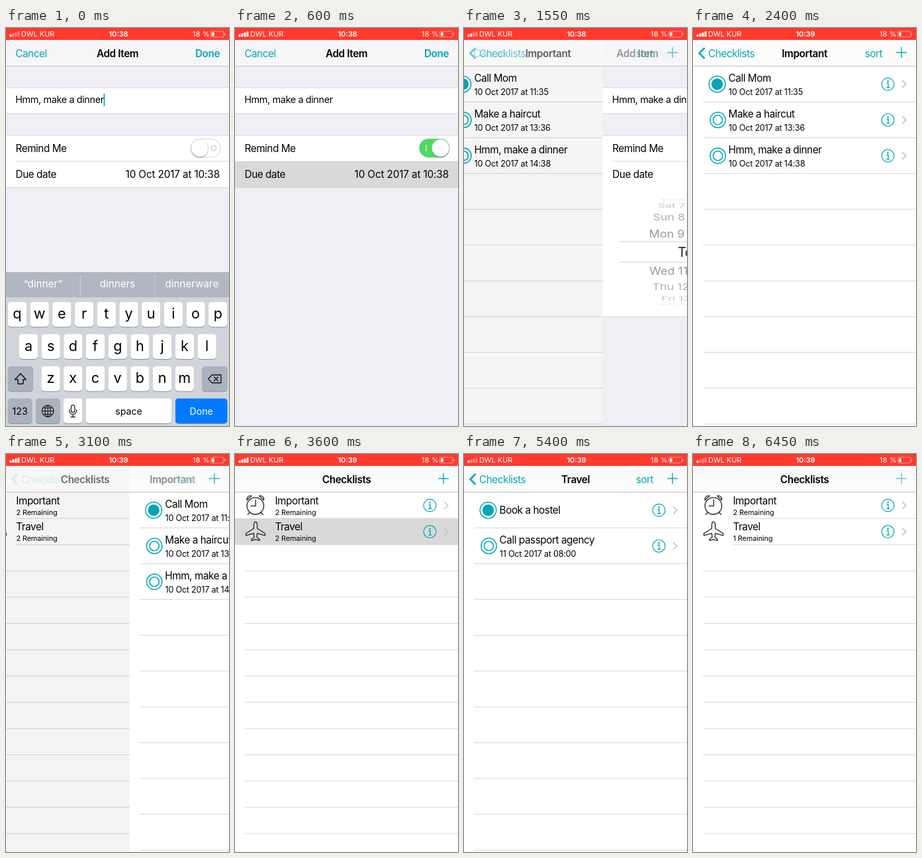
These frames come from a looping animation (337x600 px, 6500 ms). An HTML page:

```html
<!DOCTYPE html>
<html lang="en">
<head>
<meta charset="utf-8">
<title>Checklists</title>
<style>
html, body { margin: 0; width: 100%; height: 100%; overflow: hidden; background: #fff; }
svg { display: block; width: 337px; height: 600px; font-family: Inter, Roboto, sans-serif; }
text { white-space: pre; }
</style>
</head>
<body>
<svg id="stage" viewBox="0 0 337 600" xmlns="http://www.w3.org/2000/svg"></svg>
<script>
const W = 337, LOOP = 6500, STEP = 50;
const TEAL = '#08a5b5', LINE = '#d6d6da', GREY = '#f0eff5';
const stage = document.getElementById('stage');

const clamp = v => Math.max(0, Math.min(1, v));
const ramp = (t, a, b) => clamp((t - a) / (b - a));
const ease = v => v * v * (3 - 2 * v);
const easeOut = v => 1 - Math.pow(1 - v, 2.4);
const pad = n => String(n).padStart(2, '0');

const rect = (x, y, w, h, fill, extra = '') =>
  `<rect x="${x}" y="${y}" width="${w}" height="${h}" fill="${fill}" ${extra}/>`;
const hline = (x, y, x2 = W, c = LINE) => rect(x, y - .5, x2 - x, 1, c);
const path = (d, c, w, extra = '') =>
  `<path d="${d}" fill="none" stroke="${c}" stroke-width="${w}" ${extra}/>`;
const ring = (x, y, r, w, c = TEAL, fill = 'none') =>
  `<circle cx="${x}" cy="${y}" r="${r}" fill="${fill}" stroke="${c}" stroke-width="${w}"/>`;
const group = (x, y, body, op = 1) =>
  `<g transform="translate(${x.toFixed(2)} ${y.toFixed(2)})" opacity="${op.toFixed(3)}">${body}</g>`;

function text(s, x, y, o = {}) {
  const { size = 15.28, fill = '#000', anchor = 'start', weight = 400, track = -.028 } = o;
  return `<text x="${x}" y="${y}" font-size="${size}" fill="${fill}" text-anchor="${anchor}"` +
    ` font-weight="${weight}" letter-spacing="${(track * size).toFixed(3)}">${s}</text>`;
}

// ---------- status bar ----------
function statusBar(t) {
  const lit = t < 300 ? 1 : t < 1500 ? 4 : t < 2300 ? 2 : t < 5400 ? 4 : 1;
  const o = { size: 10.9, fill: '#fff', track: 0 };
  let s = rect(0, 0, W, 18, '#ff3b30');
  for (let i = 0; i < 4; i++) {
    const h = 3.4 + i * 1.5;
    s += rect(5.4 + i * 4, 13.2 - h, 3, h, '#fff', `rx=".7" opacity="${i < lit ? 1 : .4}"`);
  }
  return s + text('DWL KUR', 23, 13.3, o) +
    text(t < 2300 ? '10:38' : '10:39', 170, 13.3, { ...o, anchor: 'middle', weight: 600 }) +
    text('18 %', 282, 13.3, { ...o, track: .025 }) +
    rect(309.5, 5, 19.5, 8.6, 'none', 'rx="2" stroke="#fff" stroke-width=".9" opacity=".55"') +
    rect(311, 6.5, 3.8, 5.6, '#fff', 'rx=".8"') +
    rect(330, 7.6, 1.3, 3.4, '#fff', 'rx=".6" opacity=".55"');
}

// ---------- navigation bar items ----------
const title = (s, dx) =>
  text(s, 168.6 + dx, 43.5, { weight: 600, anchor: 'middle', track: -.024 });
const plus = op =>
  path('M307 37H323M315 29V45', TEAL, 1.4, `opacity="${op}"`);

function listNav(name, dx, backOp) {
  const back = path('M17.5 30L9.5 38L17.5 46', TEAL, 2.5) + text('Checklists', 23, 43.5, { fill: TEAL });
  return group(0, 0, back, backOp) + title(name, dx) +
    text('sort', 259.7, 43.5, { fill: TEAL }) + plus(1);
}

// ---------- shared row parts ----------
const info = y => ring(294.5, y, 9.4, 1.2) +
  `<circle cx="294.6" cy="${y - 4.4}" r="1.3" fill="${TEAL}"/>` +
  path(`M292.6 ${y - 1.4}H295V${y + 5}M292.3 ${y + 5}H297.4`, TEAL, 1.4);
const chevron = y => path(`M316.3 ${y - 5.5}L321.8 ${y}L316.3 ${y + 5.5}`, '#c4c4ca', 1.7);
const check = (y, on) => on
  ? ring(36.5, y, 12.3, 1.5) + `<circle cx="36.5" cy="${y}" r="8.7" fill="${TEAL}"/>`
  : ring(37.5, y, 11.6, 1.6) + ring(37.5, y, 7.1, 1.6);

// ---------- item lists ----------
function itemList(items, glow = 0) {
  let s = rect(0, 18, W, 582, '#fff');
  if (glow) s += rect(0, 58, W, 53.4, '#d9d9d9', `opacity="${glow}"`);
  for (let y = 111.4; y < 600; y += 53.95) s += hline(15, y);
  items.forEach(([name, due, on], i) => {
    const y = 84.7 + i * 53.95;
    s += check(y, on) + text(name, 53.6, due ? y - 3.4 : y + 5.6) + info(y) + chevron(y);
    if (due) s += text(due, 53.8, y + 16.2, { size: 12.6, track: -.017 });
  });
  return s;
}

const important = {
  body: () => itemList([
    ['Call Mom', '10 Oct 2017 at 11:35', true],
    ['Make a haircut', '10 Oct 2017 at 13:36'],
    ['Hmm, make a dinner', '10 Oct 2017 at 14:38']
  ]),
  nav: (t, dx) => listNav('Important', dx, t >= 3000 ? .35 : 1)
};

const travel = {
  body: t => itemList([
    ['Book a hostel', '', t >= 4450],
    ['Call passport agency', '11 Oct 2017 at 08:00']
  ], t < 4400 ? 0 : 1 - ramp(t, 4400, 4600)),
  nav: (t, dx) => listNav('Travel', dx, t >= 5850 ? .35 : 1)
};

// ---------- overview of checklists ----------
function clockIcon() {
  const bell = 'M18.2 69.5A5.2 5.2 0 0 1 24.8 63.2';
  const foot = 'M22.3 88L19.3 91.3';
  const side = path(bell + 'Z' + foot, '#222', 1.3, 'stroke-linecap="round"');
  return ring(30.8, 78.3, 12.7, 1.3, '#222') + path('M31.2 68.5V78.3H23.5', '#222', 1.3) +
    side + `<g transform="translate(61.6 0) scale(-1 1)">${side}</g>`;
}
function planeIcon() {
  const half = path('M31 102.3C29.4 102.3 28.4 104.5 28.4 107V112.2L16.5 119.8V122.8L28.4 119.6' +
    'L28.9 125.4L25 128.4V130.4L31 128.8', '#222', 1.3, 'stroke-linejoin="round"');
  return half + `<g transform="translate(62 0) scale(-1 1)">${half}</g>`;
}

const overview = {
  body(t) {
    let s = rect(0, 18, W, 582, '#fff');
    for (let i = 1; i < 14; i++) s += hline(i < 3 ? 61 : 15, 57.5 + i * 39.6);
    if (t >= 3600 && t < 4000) s += rect(0, 97, W, 40, '#d9d9d9');
    const left = t < 5000 ? 2 : 1;
    [['Important', 2], ['Travel', left]].forEach(([name, n], i) => {
      const y = 77.5 + i * 39.6;
      s += text(name, 60.4, y - 1.7) + text(n + ' Remaining', 60.5, y + 14.3, { size: 10.8, track: -.006 }) +
        info(y) + chevron(y);
    });
    return s + clockIcon() + planeIcon();
  },
  nav: (t, dx) => title('Checklists', dx) + plus(1 - .4 * ramp(t, 6300, 6450))
};

// ---------- date picker ----------
const DAYS = ['Fri 6', 'Sat 7', 'Sun 8', 'Mon 9', 'Today', 'Wed 11', 'Thu 12', 'Fri 13', 'Sat 14'];

function wheel(pos, label, place) {
  let s = '';
  for (let n = Math.ceil(pos - 4.2); n <= pos + 4.2; n++) {
    const k = n - pos, d = Math.abs(k), a = k * 20.5 * Math.PI / 180;
    const on = d < .5, size = on ? 20 : 17.6;
    const [x, anchor] = place(d, n, on);
    const sx = on ? 1 : 1.04 - d * .014;
    s += `<g transform="translate(${x} ${(338 + 80 * Math.sin(a)).toFixed(2)}) scale(${sx} ${Math.cos(a).toFixed(3)})"` +
      ` opacity="${on ? 1 : (.56 - d * .1).toFixed(2)}">` +
      text(label(n), 0, size * .36, { size, anchor, fill: '#222', track: on ? -.032 : 0 }) + '</g>';
  }
  return s;
}

function picker(hour) {
  const mid = base => (d, n, on) => [on ? base : base - 1 - d * .6, 'middle'];
  return wheel(4, n => DAYS[n] ? DAYS[n] + (n === 4 ? '' : ' Oct') : '',
      (d, n, on) => [on ? 168 : n < 4 ? 159 : 162.3 + d * 1.4, 'end']) +
    wheel(hour, n => pad((n + 24) % 24), mid(199)) +
    wheel(38, n => pad(n % 60), mid(256)) +
    hline(25, 322, 312, '#cfcfd3') + hline(25, 353, 312, '#cfcfd3');
}

// ---------- keyboard ----------
function key(x, y, w, fill, label = '', size = 14.2, color = '#000', dy = 24) {
  return rect(x, y + 1, w, 37.4, '#8a8e94', 'rx="4.5"') + rect(x, y, w, 37.4, fill, 'rx="4.5"') +
    text(label, x + w / 2, y + dy, { size, fill: color, anchor: 'middle', track: 0 });
}

function keyboard() {
  let s = rect(0, 368, W, 232, '#d1d5db') + rect(0, 368, W, 38, '#b1b7c1');
  s += rect(111.7, 373, 1, 32, '#cdd1d8') + rect(224.4, 373, 1, 32, '#cdd1d8');
  ['“dinner”', 'dinners', 'dinnerware'].forEach((w, i) => {
    s += text(w, 56 + i * 112.5, 391, { fill: '#fff', anchor: 'middle', track: .006, size: 15 });
  });
  ['qwertyuiop', 'asdfghjkl', 'zxcvbnm'].forEach((row, r) => {
    [...row].forEach((c, i) => {
      s += key([2.8, 19.8, 53.4][r] + i * 33.7, 413 + r * 48.5, 28.3, '#fff', c, 21.6, '#000', 25.3);
    });
  });
  const dark = '#abb2bd', round = 'stroke-linejoin="round" stroke-linecap="round"';
  s += key(2.8, 510, 38, dark) + key(296.4, 510, 38, dark);
  s += path('M22 521L13.5 530H18V536.5H26V530H30.5Z', '#111', 1.4, round);
  s += path('M311.5 523H325V535H311.5L305.5 529ZM314.5 526L320.5 532M320.5 526L314.5 532', '#111', 1.3, round);
  s += key(2.8, 558.5, 36.5, dark, '123') + key(45, 558.5, 36.5, dark) + key(87, 558.5, 28.3, '#fff') +
    key(120.7, 558.5, 129.6, '#fff', 'space') + key(256, 558.5, 78.4, '#007aff', 'Done', 14.2, '#fff');
  s += ring(63.2, 577.5, 8.8, 1.1, '#111') +
    `<ellipse cx="63.2" cy="577.5" rx="4.2" ry="8.8" fill="none" stroke="#111"/>` +
    path('M54.4 577.5H72M63.2 568.7V586.3M56 572.8H70.4M56 582.2H70.4', '#111', 1);
  s += rect(98.5, 568.5, 5.4, 11, 'none', 'rx="2.7" stroke="#111" stroke-width="1.2"') +
    path('M95.8 575.5V577A5.4 5.4 0 0 0 106.6 577V575.5M101.2 582.4V586.3M98 586.3H104.4', '#111', 1.2, round);
  return s;
}

// ---------- add item form ----------
function toggle(p) {
  const x = 292.8 + 17.8 * p;
  return rect(279, 167.3, 45, 27.6, '#fff', 'rx="13.8" stroke="#dedee0" stroke-width="1.2"') +
    group(0, 0, ring(313.8, 181.2, 4, 1, '#b9b9bd'), 1 - p) +
    group(0, 0, rect(278.5, 167, 45.8, 28, '#4cd964', 'rx="14"') + rect(288.4, 176.5, 1.1, 9.6, '#fff'), p) +
    `<circle cx="${x}" cy="182.6" r="13.4" fill="#000" opacity=".2"/>` +
    ring(x, 181, 13, .6, '#d2d2d2', '#fff');
}

const form = {
  body(t) {
    const open = 195 * ease(ramp(t, 650, 900));
    const hour = 10 + 4 * easeOut(ramp(t, 950, 1300));
    const glow = t < 550 ? 0 : 1 - ramp(t, 600, 750);
    let s = rect(0, 18, W, 582, GREY) + rect(0, 90, W, 39, '#fff') + hline(0, 90) + hline(0, 129) +
      rect(0, 162, W, 78.5 + open, '#fff') + hline(0, 162) + hline(15, 201);
    if (glow) s += rect(0, 201, W, 39.5, '#d9d9d9', `opacity="${glow}"`);
    s += text('Hmm, make a dinner', 14.2, 113.4, { size: 14.4, track: -.025 }) +
      text('Remind Me', 14.5, 186.5) + text('Due date', 14.6, 226) +
      text(`10 Oct 2017 at ${t < 1300 ? 10 : 14}:38`, 323, 226, { anchor: 'end', track: -.008 }) +
      toggle(ease(ramp(t, 0, 150)) * (t >= 50));
    if (t < 300) s += rect(147.6, 99, 1.8, 19, TEAL);
    if (open) {
      s += `<clipPath id="drum"><rect x="0" y="240.5" width="${W}" height="${Math.min(open, 177)}"/></clipPath>` +
        `<g clip-path="url(#drum)">${picker(hour)}</g>`;
    }
    s += hline(0, 240.5 + open);
    const drop = 232 * ease(ramp(t, 250, 550));
    return drop < 232 ? s + group(0, drop, keyboard()) : s;
  },
  nav: (t, dx) => text('Cancel', 14.2, 43.5, { fill: TEAL }) + title('Add Item', dx) +
    group(0, 0, text('Done', 323, 43.5, { fill: TEAL, weight: 600, anchor: 'end' }), t >= 1450 ? .13 : 1)
};

// ---------- screen stack ----------
const barBack = rect(0, 18, W, 39.5, '#fafafb', 'opacity=".6"') + hline(0, 57.5, W, '#c2c2c6');

function single(s, t) {
  return s.body(t) + barBack + s.nav(t, 0);
}

// p = 1: the upper screen covers the lower one
function stack(low, top, p, t) {
  if (p >= 1) return single(top, t);
  if (p <= 0) return single(low, t);
  const x = W * (1 - p);
  return group(-W * .3 * p, 0, low.body(t)) +
    rect(0, 18, W, 582, '#000', `opacity="${(.1 * p).toFixed(3)}"`) +
    group(x, 0, top.body(t)) + barBack +
    group(0, 0, low.nav(t, -110 * p), 1 - p) +
    group(0, 0, top.nav(t, 150 * (1 - p)), p);
}

function scene(t) {
  const slide = (a, b) => easeOut(ramp(t, a, b));
  if (t < 2000) return stack(important, form, 1 - slide(1450, 1750), t);
  if (t < 3500) return stack(overview, important, 1 - slide(3000, 3350), t);
  if (t < 5000) return stack(overview, travel, slide(3600, 3900), t);
  return stack(overview, travel, 1 - slide(5850, 6200), t);
}

let shown = -1;
function draw(now) {
  const t = Math.floor((now % LOOP) / STEP) * STEP;
  if (t !== shown) {
    shown = t;
    stage.innerHTML = scene(t) + statusBar(t);
  }
  requestAnimationFrame(draw);
}
draw(performance.now());
</script>
</body>
</html>
```
